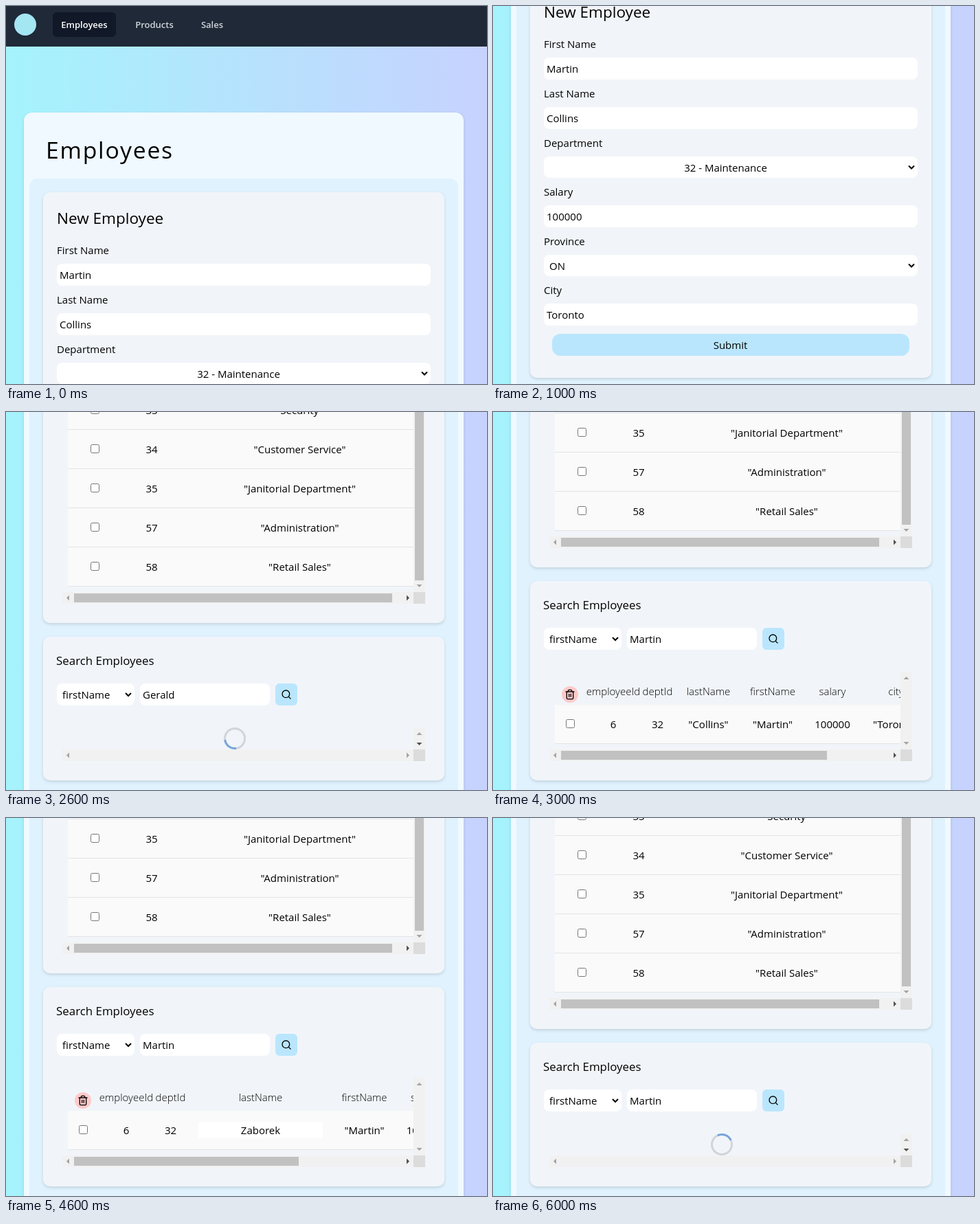
These frames come from a looping animation (700x550 px, 7000 ms). An HTML page:

```html
<!DOCTYPE html>
<html lang="en">
<head>
<meta charset="utf-8">
<style>
html, body { margin: 0; width: 100%; height: 100%; overflow: hidden; }
svg { display: block; font: 15px "Open Sans", "Noto Sans", sans-serif; }
.card { filter: drop-shadow(0 2px 2px rgba(0, 0, 0, .13)); }
.icon { fill: none; stroke: #000; stroke-width: 2; stroke-linecap: round; stroke-linejoin: round; }
</style>
</head>
<body>
<svg width="700" height="550" viewBox="0 0 700 550">
  <defs>
    <linearGradient id="sky">
      <stop stop-color="#a5f3fc"/><stop offset="1" stop-color="#c7d2fe"/>
    </linearGradient>
    <clipPath id="tableClip"><rect x="82" y="370" width="511" height="121"/></clipPath>
  </defs>
  <rect width="700" height="550" fill="url(#sky)"/>
  <g id="scene"></g>
</svg>
<script>
const PERSON = 'Martin', SURNAME = 'Collins', NEW_SURNAME = 'Zaborek', OTHER = 'Gerald';
const quote = s => `"${s}"`;

const rect = (x, y, w, h, fill, r = 0, attrs = '') =>
  `<rect x="${x}" y="${y}" width="${w}" height="${h}" rx="${r}" fill="${fill}" ${attrs}/>`;
const text = (x, y, s, attrs = '') => `<text x="${x}" y="${y}" ${attrs}>${s}</text>`;
const centered = (x, y, s, attrs = '') => text(x, y, s, `text-anchor="middle" ${attrs}`);
const shift = (dy, body) => `<g transform="translate(0 ${dy})">${body}</g>`;
const card = (x, y, w, h, fill, r) => rect(x, y, w, h, fill, r, 'class="card"');
const panel = (y, h) => card(54, y, 584, h, '#f1f5f9', 10);
const field = (x, y, w, h = 32) => rect(x, y, w, h, '#fff', 8);
const chevron = (x, y) =>
  `<path d="M${x - 4} ${y - 2}l4 4 4-4" fill="none" stroke="#000" stroke-width="2"/>`;
const checkbox = (x, y) =>
  rect(x + .5, y + .5, 12, 12, '#fff', 2, 'stroke="#767676"');
const icon = (x, y, d) =>
  `<path class="icon" transform="translate(${x} ${y}) scale(.667)" d="${d}"/>`;
const arrow = (x, y, angle, active) =>
  `<path d="M-4 2L0-2 4 2z" transform="translate(${x} ${y}) rotate(${angle})" fill="${active ? '#505050' : '#a3a3a3'}"/>`;

function page(top) {
  const h = 1400;
  return card(26, top, 640, h, '#f0f9ff', 12) + rect(34, top + 96, 624, h, '#e0f2fe', 12);
}

function form(scroll) {
  const rows = [
    ['First Name', 361, 375, PERSON], ['Last Name', 433, 447, SURNAME],
    ['Department', 505, 519, '32 - Maintenance', true], ['Salary', 576, 590, '100000'],
    ['Province', 648, 662, 'ON', true], ['City', 719, 733, 'Toronto'],
  ];
  const fields = rows.map(([label, base, y, value, select]) =>
    text(74, base, label) + field(74, y, 544, select ? 31 : 32) +
    (value.length > 10 ? centered(338.5, y + 22, value) : text(select ? 82 : 78, y + 22, value)) +
    (select ? chevron(609, y + 15.5) : '')).join('');
  const nav = rect(0, 0, 700, 59, '#1f2937') + '<circle cx="28" cy="27" r="16" fill="#a5e6f3"/>' +
    rect(68, 9, 92, 36, '#111827', 6) +
    [['Employees', 114, '#fff'], ['Products', 216, '#d1d5db'], ['Sales', 300, '#d1d5db']]
      .map(([s, x, fill]) => centered(x, 32, s, `fill="${fill}" font-size="13" font-weight="600"`)).join('');
  return shift(-scroll, page(155) + nav +
    text(58, 222, 'Employees', 'font-size="33.7" letter-spacing="1.8"') +
    panel(271, 570) + text(74, 317, 'New Employee', 'font-size="22.5"') + fields +
    rect(86, 777, 520, 32, '#bae6fd', 12) + centered(345.5, 799, 'Submit'));
}

// Horizontal scrollbar with its corner; no thumb when thumbEnd is absent.
const scrollbar = (y, thumbEnd) =>
  rect(82, y, 511, 17, '#f1f1f1') + rect(593, y, 17, 17, '#dcdcdc') +
  (thumbEnd ? rect(99, y + 2, thumbEnd - 99, 13, '#c1c1c1') : '') +
  arrow(90, y + 8.5, -90) + arrow(585, y + 8.5, 90, thumbEnd);

function departments() {
  const rows = [[33, 'Security'], [34, 'Customer Service'], [35, 'Janitorial Department'],
    [57, 'Administration'], [58, 'Retail Sales']];
  return panel(-100, 407) + rect(90, -60, 503, 314, '#fafafa') +
    rows.map(([id, name], i) => {
      const y = -31 + 57 * i;
      return rect(90, y + 56, 503, 1, '#e2e4e6') + checkbox(123, y + 21) +
        centered(212, y + 34, id) + centered(427.5, y + 34, quote(name));
    }).join('') +
    rect(593, -60, 17, 322, '#f1f1f1') + rect(595, -60, 13, 305, '#c1c1c1') +
    arrow(601.5, 253, 180) + scrollbar(262, 562);
}

const searchBar = query =>
  text(73, 368, 'Search Employees', 'font-size="16.9"') +
  field(74, 395, 113) + text(82, 417, 'firstName') + chevron(178, 411) +
  field(195, 395, 189) + text(199, 417, query) + rect(392, 395, 32, 32, '#bae6fd', 6) +
  icon(400, 403, 'M3 11a8 8 0 1 0 16 0a8 8 0 1 0-16 0M21 21l-4.35-4.35');

const loading = (query, angle) => page(-300) + departments() + panel(327, 209) + searchBar(query) +
  `<g transform="rotate(${angle} 333 475)" fill="none" stroke-width="3">
    <circle cx="333" cy="475" r="14.5" stroke="#d1d5db"/>
    <path d="M322.75 464.75A14.5 14.5 0 0 1 343.25 464.75" stroke="#75a5dc"/></g>` +
  rect(593, 459, 17, 32, '#f1f1f1') + arrow(601.5, 468, 0) + arrow(601.5, 483, 180, true) +
  scrollbar(491);

function results(surname, [last, first, salary, city], thumbEnd, editing) {
  const columns = [['employeeId', 175, 6], ['deptId', 239.5, 32],
    ['lastName', last, editing ? surname : quote(surname)], ['firstName', first, quote(PERSON)],
    ['salary', salary, 100000], ['city', city, quote('Toronto')]];
  const table = rect(90, 426, 503, 57, '#fafafa') + rect(90, 482, 503, 1, '#e2e4e6') +
    (editing ? rect(280, 442, 181, 24, '#fff') : '') +
    columns.map(([head, x, value]) =>
      centered(x, 412, head, 'font-weight="300"') + centered(x, 460, value)).join('');
  return page(-300) + shift(-81, departments()) + panel(246, 290) + shift(-81, searchBar(PERSON)) +
    `<g clip-path="url(#tableClip)">${table}</g>` +
    '<circle cx="112" cy="411" r="12" fill="#fecaca"/>' +
    icon(104, 403, 'M3 6h18M19 6v14a2 2 0 0 1-2 2H7a2 2 0 0 1-2-2V6M8 6V4a2 2 0 0 1 2-2h4a2 2 0 0 1 2 2v2M10 11v6M14 11v6') +
    checkbox(106, 447) + rect(593, 378, 17, 113, '#f1f1f1') +
    arrow(601.5, 387, 0) + arrow(601.5, 482, 180) + scrollbar(491, thumbEnd);
}

const scenes = [
  form(0),
  form(300),
  loading(OTHER, 217),
  results(SURNAME, [313.5, 407, 494, 586.5], 486),
  results(NEW_SURNAME, [370.5, 521.5, 608.5, 720], 426, true),
  results(NEW_SURNAME, [315.5, 411, 498, 590.5], 483),
  loading(PERSON, 20),
];

const stage = document.getElementById('scene');
let shown = -1;
function draw(now) {
  const index = Math.floor(now / 1000) % scenes.length;
  if (index !== shown) stage.innerHTML = scenes[shown = index];
  requestAnimationFrame(draw);
}
draw(0);
</script>
</body>
</html>
```
